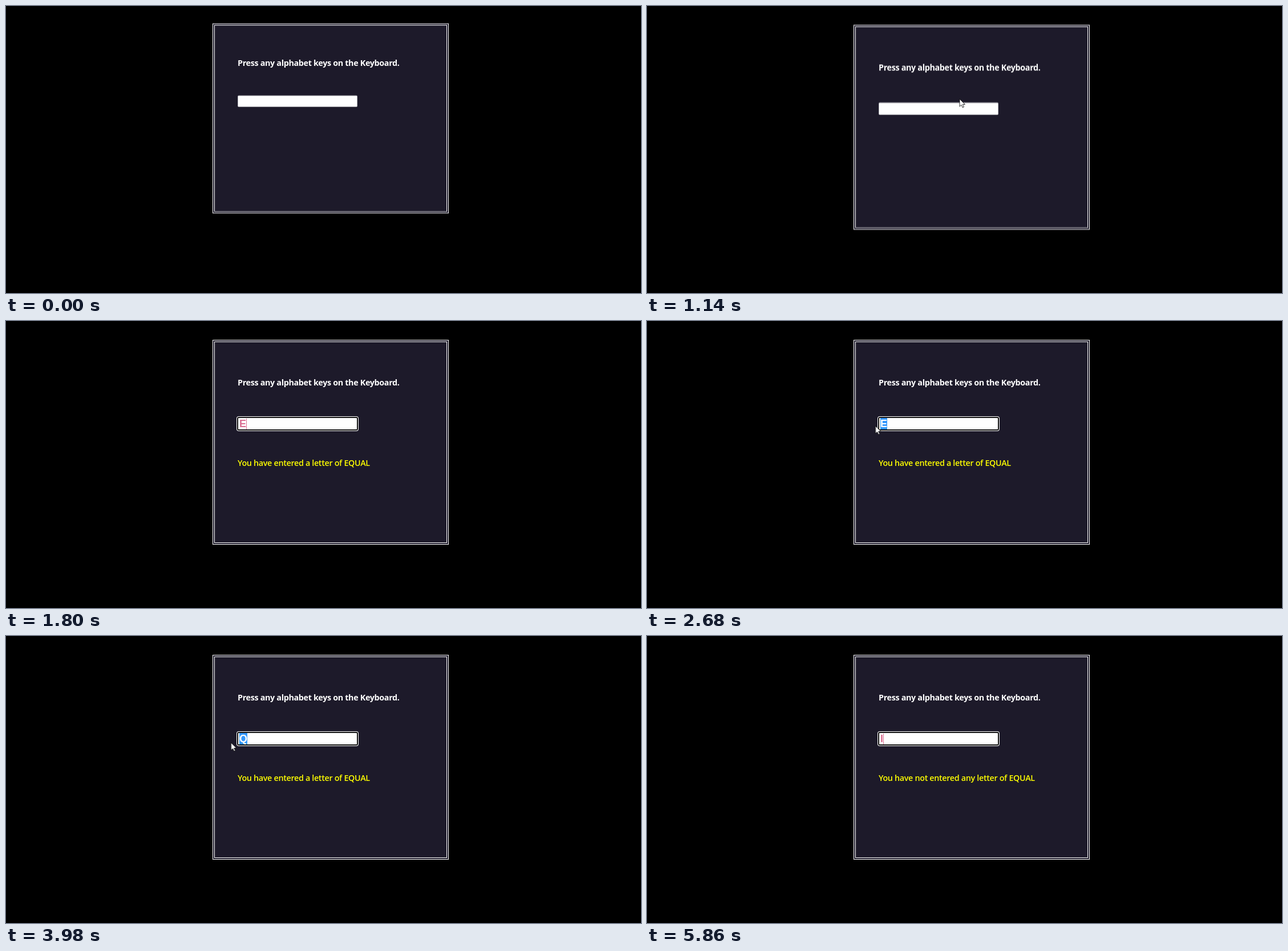
Write an HTML page that moves like this. It is 1113 by 503 pixels and loops after 6020 ms.

```html
<!DOCTYPE html>
<html lang="en">
<head>
<meta charset="utf-8">
<title>Alphabet keys</title>
<style>
  :root { --pink: #db7093; --card: #1d1a2a; --loop: 6020ms step-end infinite; }
  html, body { margin: 0; width: 100%; height: 100%; overflow: hidden; background: #000; }
  .scene, .scene * { position: absolute; box-sizing: border-box; }
  .scene {
    left: 0; top: 0; width: 1113px; height: 503px; overflow: hidden;
    transform-origin: 0 0; animation: settle var(--loop);
  }
  .card {
    left: 362px; top: 33px; width: 414px; height: 359px;
    background: var(--card); border: 1px solid #fff;
    box-shadow: inset 0 0 0 2px var(--card), inset 0 0 0 3px #fff;
  }
  .line {
    left: 406px; margin: 0; white-space: nowrap; color: #ff0;
    font: 600 14.3px/20px "Open Sans", "Noto Sans", sans-serif; letter-spacing: -.31px;
  }
  .title { top: 98px; color: #fff; font-weight: 700; }
  .result { top: 239px; }
  .field {
    left: 406px; top: 169px; width: 210px; height: 22px;
    background: #fff; border: 1px solid #b5b5ba; border-radius: 2px;
    animation: focus var(--loop);
  }
  .key {
    left: 2px; top: 0; color: var(--pink);
    font: 700 18px/20px "Liberation Sans", Arial, sans-serif;
  }
  .caret { left: 0; top: 1px; width: 1px; height: 19px; background: var(--pink); animation: caret var(--loop); }
  .pointer { left: 0; top: 0; width: 1px; height: 1px; overflow: visible; animation: move 6020ms linear infinite; }
  .arrow { fill: #fff; stroke: #000; stroke-width: .8; animation: arrow var(--loop); }
  .beam { fill: none; stroke: #222; animation: beam var(--loop); }
  .hit { animation: hit var(--loop); }
  .miss { animation: miss var(--loop); }
  .first { animation: first var(--loop); }
  .second { animation: second var(--loop); }

  @keyframes settle {
    0% { transform: scaleY(.927); }
    .83%, 100% { transform: none; }
  }
  @keyframes focus {
    0% { border-color: #b5b5ba; box-shadow: none; }
    24.08%, 100% { border-color: #101010; box-shadow: 0 0 0 1px #101010, 0 0 0 2px #fff; }
  }
  @keyframes hit {
    0%, 79.73%, 100% { opacity: 0; }
    29.9% { opacity: 1; }
  }
  @keyframes miss {
    0% { opacity: 0; }
    79.73%, 100% { opacity: 1; }
  }
  /* typed, then selected, then replaced */
  @keyframes first {
    0%, 48.67%, 100% { opacity: 0; color: var(--pink); background: transparent; }
    29.9% { opacity: 1; color: var(--pink); background: transparent; }
    42.5% { opacity: 1; color: #fff; background: #3297fd; }
  }
  @keyframes second {
    0%, 79.73%, 100% { opacity: 0; color: var(--pink); background: transparent; }
    48.67% { opacity: 1; color: var(--pink); background: transparent; }
    62.4% { opacity: 1; color: #fff; background: #3297fd; }
  }
  @keyframes caret {
    0% { opacity: 0; transform: translateX(2px); }
    24.08% { opacity: 1; transform: translateX(2px); }
    29.9% { opacity: 1; transform: translateX(14px); }
    38.7% { opacity: 0; transform: translateX(14px); }
    48.67% { opacity: 1; transform: translateX(16px); }
    57.47% { opacity: 0; transform: translateX(16px); }
    79.73% { opacity: 1; transform: translateX(7px); }
    88.87% { opacity: 0; transform: translateX(7px); }
    97.34%, 100% { opacity: 1; transform: translateX(7px); }
  }
  @keyframes move {
    0% { transform: translate(701px, 60px); }
    13.62% { transform: translate(701px, 60px); animation-timing-function: steps(8); }
    18.93% { transform: translate(548px, 163px); animation-timing-function: steps(6); }
    23.25% { transform: translate(470px, 181px); }
    35.71% { transform: translate(470px, 181px); animation-timing-function: steps(8); }
    39.86% { transform: translate(432px, 182px); animation-timing-function: steps(8); }
    44.51% { transform: translate(400.5px, 184px); }
    55.14% { transform: translate(400.5px, 184px); animation-timing-function: steps(7); }
    59.13% { transform: translate(436px, 182px); animation-timing-function: steps(8); }
    64.61% { transform: translate(394.5px, 187px); }
    66.94% { transform: translate(394.5px, 187px); animation-timing-function: steps(2); }
    68.6% { transform: translate(390px, 189px); animation-timing-function: steps(3); }
    70.09% { transform: translate(400px, 190px); }
    91.86% { transform: translate(400px, 190px); animation-timing-function: steps(4); }
    94.68%, 100% { transform: translate(560px, -50px); }
  }
  @keyframes arrow {
    0%, 20.37%, 48.67%, 55.8%, 79.73%, 94.68%, 100% { opacity: 0; }
    13.62%, 43.8%, 55.14%, 64.3%, 91.86% { opacity: 1; }
  }
  @keyframes beam {
    0%, 29.9%, 43.8%, 64.3%, 100% { opacity: 0; }
    20.37%, 35.71%, 55.8% { opacity: 1; }
  }
</style>
</head>
<body>
<main class="scene">
  <div class="card"></div>
  <p class="line title">Press any alphabet keys on the Keyboard.</p>
  <div class="field">
    <span class="key first">E</span>
    <span class="key second">Q</span>
    <span class="key miss">I</span>
    <i class="caret"></i>
  </div>
  <p class="line result hit">You have entered a letter of EQUAL</p>
  <p class="line result miss">You have not entered any letter of EQUAL</p>
  <svg class="pointer">
    <path class="arrow" d="M0 0V13.2L3.1 10.4 5.2 15 7.4 14 5.3 9.5H9.4Z"/>
    <path class="beam" d="M-2.5-6.5H2.5M0-6.5V6.5M-2.5 6.5H2.5"/>
  </svg>
</main>
</body>
</html>
```
